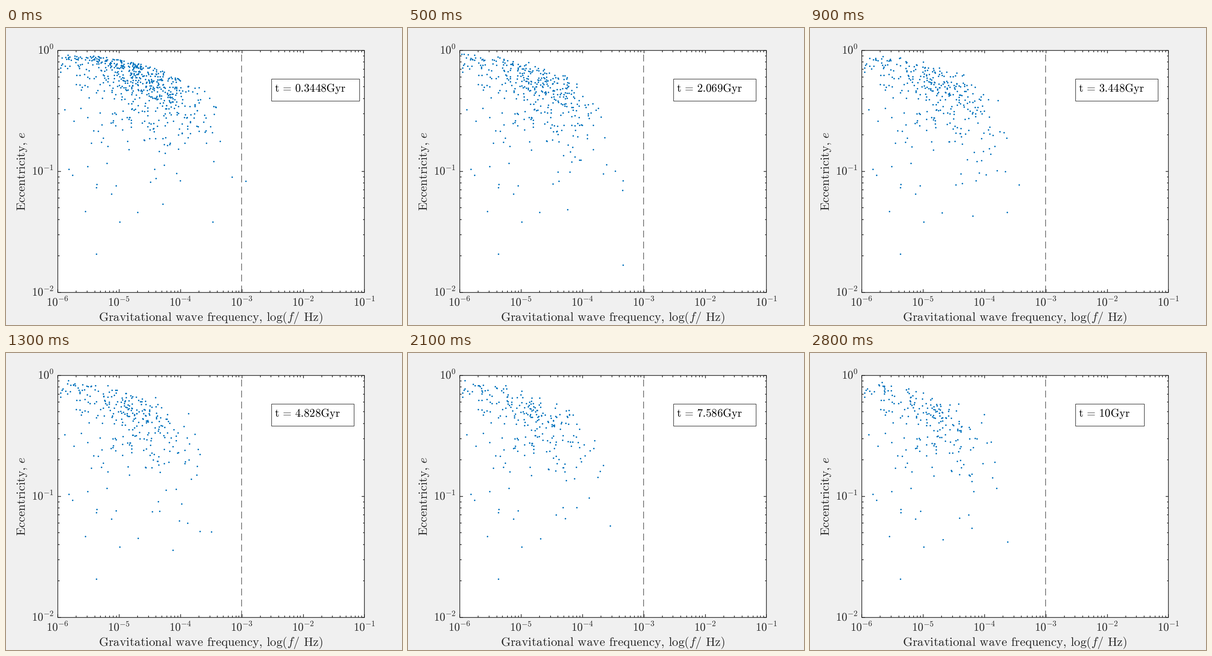
A matplotlib script that plays this animation: 864x648 px, repeating every 2900 ms.

```python
import numpy as np
import matplotlib.pyplot as plt
from matplotlib.animation import FuncAnimation
from matplotlib.patches import Rectangle

W, H, DPI = 864, 648, 100
PT = 72 / DPI                      # points per pixel
N_FRAMES, T_END = 29, 10.0
T_START = T_END / N_FRAMES
LEFT, RIGHT, TOP, BOTTOM = 112.4, 781.9, 48.2, 576
DEC_X, DEC_Y = (RIGHT - LEFT) / 5, (BOTTOM - TOP) / 2
INK, BLUE = "#262626", "#0072BD"

plt.rcParams["mathtext.fontset"] = "cm"

fig = plt.figure(figsize=(W / DPI, H / DPI), dpi=DPI, facecolor="#f0f0f0")
ax = fig.add_axes([0, 0, 1, 1])
ax.set_xlim(-0.5, W - 0.5)
ax.set_ylim(H - 0.5, -0.5)
ax.axis("off")


# ---- orbital decay by gravitational waves (Peters 1964) ----
GYR_CIRCULAR = 550                 # merger time of a circular orbit at 1e-5 Hz

LOGIT = np.linspace(-9, 9, 6001)
E_GRID = 1 / (1 + np.exp(-LOGIT))


def size_factor(e):
    return e**(12 / 19) / (1 - e**2) * (1 + 121 / 304 * e**2)**(870 / 2299)


def shift(e):
    """Ratio between the decay frequency and the plotted one."""
    return 1 + 5 * e**4.6


def merger_integral():
    rate = (E_GRID**(29 / 19) * (1 + 121 / 304 * E_GRID**2)**(1181 / 2299)
            / (1 - E_GRID**2)**1.5 * E_GRID * (1 - E_GRID))
    steps = (rate[1:] + rate[:-1]) / 2 * np.diff(LOGIT)
    start = 19 / 48 * E_GRID[0]**(48 / 19)
    return start + np.concatenate([[0], np.cumsum(steps)])


LOG_I = np.log(merger_integral())


def to_orbit(x, y):
    f = 10**((x - LEFT) / DEC_X - 1)          # in units of 1e-5 Hz
    e = 10**(-(y - TOP) / DEC_Y)
    return f, e


def to_pixels(f, e):
    return LEFT + (np.log10(f) + 1) * DEC_X, TOP - np.log10(e) * DEC_Y


# ---- population at the first instant, in pixels ----
OUTLIERS = [(196, 492), (247, 422), (172, 399), (286.5, 401), (229, 361),
            (326, 327), (341.3, 383), (344.6, 298), (450, 422), (522, 333)]


def crest(x):
    """Upper edge of the cloud."""
    return 58 + 102 * np.clip((x - LEFT) / 357, 0, 1)**2.5


def population():
    rng = np.random.default_rng(12)

    x = rng.normal(297, 75, 550)
    x = x[(x > 116) & (x < 468)]
    y = crest(x) + rng.gamma(1.25, 0.8 * (8 + 0.22 * (x - LEFT)))
    main = np.column_stack([x, y])[y < 265]

    x = rng.uniform(118, 220, 22)
    corner = np.column_stack([x, crest(x) + rng.exponential(8, 22)])

    x = rng.triangular(115, 190, 520, 66)
    y = crest(x) + 60 + rng.gamma(1.6, 62, 66)
    sparse = np.column_stack([x, y])[y < 350]

    # very eccentric orbits that drift in from the left
    incoming = np.column_stack([rng.uniform(50, 108, 16),
                                rng.uniform(50.5, 55, 16)])
    return np.vstack([OUTLIERS, main, corner, sparse, incoming])


F0, E0 = to_orbit(*population().T)
C0 = (F0 * shift(E0))**(-2 / 3) / size_factor(E0)
SCALE = 48 / 19 * GYR_CIRCULAR * C0**4
LIFE = SCALE * np.exp(np.interp(np.log(E0 / (1 - E0)), LOGIT, LOG_I))


def positions(t):
    left = LIFE - (t - T_START)
    alive = (left > 0) | (t <= T_START)
    log_i = np.log(left[alive] / SCALE[alive])
    e = 1 / (1 + np.exp(-np.interp(log_i, LOG_I, LOGIT)))
    f = (C0[alive] * size_factor(e))**-1.5 / shift(e)
    x, y = to_pixels(f, e)
    inside = (x >= LEFT) & (x <= RIGHT) & (y <= BOTTOM)
    return x[inside], y[inside]


# ---- fixed parts ----
def line(xs, ys, color=INK, width=1.5, **kw):
    return ax.plot(xs, ys, color=color, lw=width * PT, **kw)[0]


def label(x, y, s, px, **kw):
    kw = {"color": INK, "va": "baseline", **kw}
    return ax.text(x, y, s, fontsize=px * PT, **kw)


def log_ticks(decades):
    """Yield position in decades and tick length."""
    for d in range(decades):
        for m in range(1, 10):
            yield d + np.log10(m), 6.7 if m == 1 else 3.8
    yield decades, 6.7


def tick(x, y, dx, dy):
    line([x, x + dx], [y, y + dy], solid_capstyle="butt")


def draw_axes():
    frame = (LEFT, TOP), RIGHT - LEFT, BOTTOM - TOP
    ax.add_patch(Rectangle(*frame, fc="white", ec="none", zorder=0))
    line([513.8, 513.8], [BOTTOM, TOP], "#5c5c5c", 1.5,
         dashes=(15 / 1.5, 9 / 1.5), dash_capstyle="butt")
    ax.add_patch(Rectangle(*frame, fc="none", ec=INK, lw=1.5 * PT, zorder=3))

    for u, size in log_ticks(5):
        x = LEFT + u * DEC_X
        tick(x, BOTTOM, 0, -size)
        tick(x, TOP, 0, size)
    for u, size in log_ticks(2):
        y = BOTTOM - u * DEC_Y
        tick(LEFT, y, size, 0)
        tick(RIGHT, y, -size, 0)
    for d in range(6):
        label(LEFT + d * DEC_X - 0.5, 606, f"$10^{{{d - 6}}}$", 24.4,
              ha="center")
    for d in range(3):
        label(104, BOTTOM - d * DEC_Y + 8, f"$10^{{{d - 2}}}$", 24.4,
              ha="right")

    gap, after_comma = r"\hspace{0.38}", r"\hspace{0.18}"
    label(446, 639,
          rf"$\mathrm{{Gravitational{gap}wave{gap}frequency,{after_comma}log(}}"
          rf"f\mathrm{{/{gap}Hz)}}$", 27.1, ha="center")
    label(41.5, 312, rf"$\mathrm{{Eccentricity,{after_comma}}}e$", 27.1,
          ha="center", rotation=90, rotation_mode="anchor")


draw_axes()
dots = ax.plot([], [], "o", color=BLUE, ms=3.3 * PT, mew=0, zorder=2)[0]
dots.set_snap(False)
box = ax.add_patch(Rectangle((578, 110), 192, 48, fc="white", ec=INK,
                             lw=1.1 * PT, zorder=4))
clock = label(586, 139, "", 24.4, color="black", zorder=5)


def draw(i):
    t = T_END * (i + 1) / N_FRAMES
    value = f"{t:.4g}"
    dots.set_data(*positions(t))
    clock.set_text(rf"$\mathrm{{t\hspace{{0.18}}=\hspace{{0.18}}{value}Gyr}}$")
    digits = len(value.replace(".", ""))
    box.set_width(126 + 12 * digits + 6.5 * ("." in value))
    return dots, clock, box


anim = FuncAnimation(fig, draw, frames=N_FRAMES, interval=100,
                     repeat=True, repeat_delay=0, blit=False)
plt.show()
```
